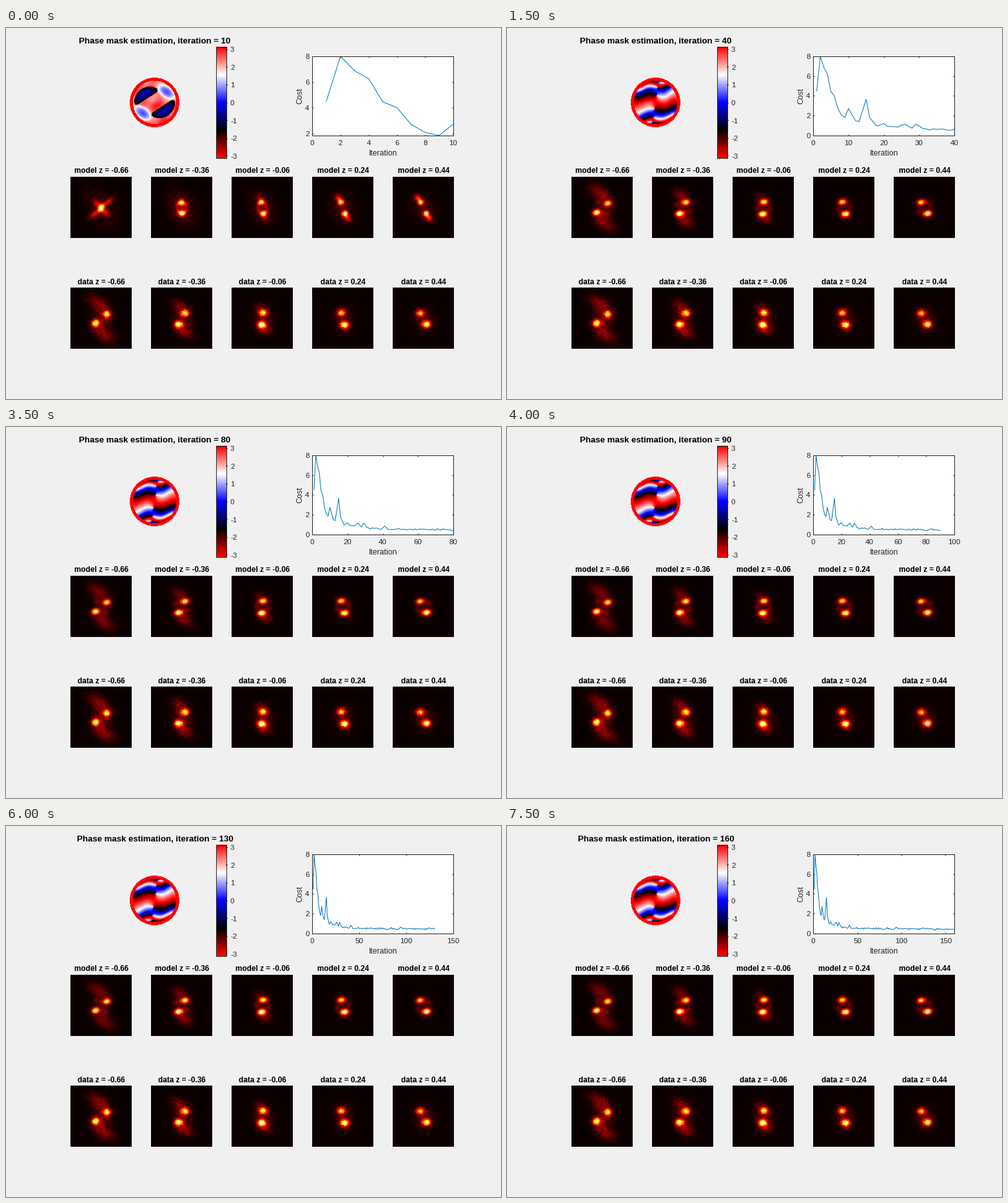
Write a matplotlib script that moves like this. It is 768x576 px and loops after 8 s.

```python
import matplotlib.pyplot as plt
import numpy as np
from matplotlib.animation import FuncAnimation
from matplotlib.colors import LinearSegmentedColormap

W, H, DPI = 768, 576, 100
FRAMES, INTERVAL = 16, 500
TOTAL = 10 * FRAMES
PX = 72 / DPI  # points per pixel
INK = "#262626"
DEPTHS = (-0.66, -0.36, -0.06, 0.24, 0.44)
SIDE, CELLS = 95, 45

plt.rcParams["font.family"] = "Liberation Sans"
PHASE = LinearSegmentedColormap.from_list(
    "phase", ["red", "black", "blue", "white", "red"], N=256)

fig = plt.figure(figsize=(W / DPI, H / DPI), dpi=DPI, facecolor="#f0f0f0")
stage = fig.add_axes([0, 0, 1, 1])


def label(x, y, s, size, **kw):
    kw = {"ha": "center", "va": "baseline", "color": INK, **kw}
    return stage.text(x, y, s, fontsize=size * PX, **kw)


def picture(data, left, top, w, h, cmap, lo, hi):
    return stage.imshow(data, extent=(left, left + w, top + h, top), cmap=cmap,
                        vmin=lo, vmax=hi, interpolation="nearest", aspect="auto")


# ---- cost curve ----
def cost_curve():
    n = np.arange(1, TOTAL + 1)
    knots = [1, 2, 3, 4, 5, 6, 7, 8, 9, 10, 12, 13, 15, 16, 18, 20]
    costs = [4.5, 8, 6.87, 6.25, 4.45, 4, 2.7, 2.07, 1.83, 2.73, 1.5, 1.4,
             3.65, 1.8, 0.95, 1.2]
    late = 0.51 - 0.0007 * (n - 43) + 0.5 * np.exp(-(n - 20) / 9)
    late += 0.05 * np.random.default_rng(4).standard_normal(n.size)
    for at, rise in ((26, 0.45), (29.5, 0.5), (41, 0.25), (94, 0.2)):
        late += rise * np.exp(-(n - at) ** 2)
    return np.where(n <= 20, np.interp(n, knots, costs), late)


def x_axis(it):
    """Upper limit and tick step: at most six steps, rounded up to a tick."""
    step = next(s for s in (2, 5, 10, 20, 50) if it <= 6 * s)
    return min(-(-it // step) * step, TOTAL), step


# ---- phase mask ----
def oval(x, y, cx, cy, a, b, deg, bend=0.0):
    t = np.radians(deg)
    u = (x - cx) * np.cos(t) + (y - cy) * np.sin(t)
    v = (y - cy) * np.cos(t) - (x - cx) * np.sin(t) - bend * (u * u - a * a / 3)
    return np.hypot(u / a, v / b)


def first_phase(x, y):
    p = 2.6 + 0.4 * np.sin(0.13 * x + 0.2 * y) * np.cos(0.12 * x - 0.05 * y)
    for s in (1, -1):
        q = oval(s * x, s * y, 18.5, -16.5, 14, 8, 36)
        rim = p - (p - 1.57) * np.exp(-3 * np.maximum(q - 1, 0))
        p = np.where(q < 1, 1.57 - 1.1 * (1 - q * q), rim)
    for s in (1, -1):
        q = oval(s * x, s * y, -15, -12, 21, 8.5, -33, 0.012)
        p = np.where(q < 1, -1.75 + 1.3 * (1 - q * q), p)
    return p


def helix_phase(x, y, it):
    """Two opposite phase ramps that meet in a column of vortices."""
    d = y - 3 * np.sin(0.15 * x) + 0.2 * x * np.abs(y) / 33
    ramp = 0.125 * d + 0.00012 * d ** 3
    side = np.tanh((x + 0.15 * y) / 5)
    p = np.angle(-np.cos(ramp) - 1j * side * np.sin(ramp))
    rough = np.exp(-(it - 20) / 11)
    p = p + 0.7 * rough * np.sin(0.2 * x + 0.15 * y) * np.cos(0.08 * x - 0.2 * y)
    return np.angle(np.exp(1j * p))


def mask(it):
    x, y = np.meshgrid(np.arange(77) - 38, np.arange(77) - 38)
    r = np.hypot(x, y)
    p = first_phase(x, y) if it == 10 else helix_phase(x, y, it)
    p = np.where(r > 33.6, np.pi, p)
    return np.where(r > 38.4, np.nan, p)


# ---- point spread images ----
axis = (np.arange(CELLS) + 0.5) * SIDE / CELLS
X, Y = np.meshgrid(axis - 47.7, axis - 48.4)


def blob(x, y, amp, sx, sy, deg=0):
    return amp * np.exp(-0.5 * oval(X, Y, x, y, sx, sy, deg) ** 2)


def pair(x, y, amp, sx, sy, deg=0, ratio=1.0):
    """A blob and its mirror image through the centre, `ratio` as strong."""
    return blob(x, y, amp, sx, sy, deg) + blob(-x, -y, ratio * amp, sx, sy, deg)


def lobe(z):
    """The two lobes turn steadily with depth."""
    a, r = np.radians(2 - 75 * z), 9.3 + 4 * z * z
    return r * np.sin(a), -r * np.cos(a)


def cloud(z, amp):
    """Faint arcs that lead from each lobe outwards."""
    (lx, ly), r = lobe(z), 16.5 - 18.7 * z
    cx, cy, size = -0.34 * r, -0.94 * r, r / 29
    upper = np.clip(0.5 - 0.8 * z, 0, 1)
    far = pair(-cx, -cy, amp, 8 * size + 2, 5 * size + 2, 35, upper)
    near = pair(-(cx + lx) / 2 - 3 * size, -(cy + ly) / 2 + 2 * size, amp,
                7 * size + 2, 5 * size + 2, 50, upper)
    return far + near + blob(2, 2, 0.5 * amp, 10, 11)


def lobes(z, sx, sy, deg):
    x, y = lobe(z)
    return pair(-x, -y, 1, sx, sy, deg, 0.87)


def ripple(amount):
    return 1 + amount * np.cos(0.45 * X + 0.5 * Y + 0.05 * X * np.sin(0.2 * Y))


def first_model(z):
    """A cross that opens into a ring and then splits in two lobes."""
    t = (z + 0.66) / 1.1
    x, y = 5 * t - 1, 8.6 * np.tanh(4 * t + 0.25)
    cross = np.exp(-8 * t)
    ring = np.exp(-((t - 0.4) / 0.2) ** 2)
    img = pair(x, y, 1, 3, 3.2, 0, 0.85)
    img += cross * (pair(-10, 9, 0.6, 7, 2.8, -35) + pair(7, 7, 0.5, 5, 3, 45))
    img += 0.4 * ring * np.exp(-((oval(X, Y, 0, 0, 7, 9, 0) - 1) / 0.35) ** 2)
    img += pair(2.2 * x, 1.8 * y, 0.45 * t, 4, 3.2, 35)
    return img + blob(0, 0, 0.13 - 0.06 * t, 13, 23 - 8 * t, -30) * ripple(0.35)


def model(z, it):
    if it == 10:
        img = first_model(z)
    else:
        early = np.exp(-(it - 20) / 13)
        x, y = lobe(z)
        img = lobes(z, 4.3, 3.1, -14) + pair(-y, x, 0.14, 3, 3)
        img += cloud(z, 0.105) * (1 - early * z) * ripple(0.3 * early)
        wisps = blob(4, -20, 1, 3, 6, 30) + blob(15, 2, 1, 3, 8, 35) + blob(-2, 14, 1, 4, 6)
        img += 0.4 * early * max(-z, 0) * wisps
    return img / img.max()


def measured(z, seed):
    rng = np.random.default_rng(seed)
    img = lobes(z, 4.2, 3.7, -8) + cloud(z, 0.125) + blob(0, 0, 0.06, 11, 13)
    img += 0.075 * np.sqrt(img) * rng.standard_normal(img.shape)
    return np.clip(img / img.max(), 0, 1)


# ---- layout ----
title = label(231, 24, "", 13.2, weight="bold", color="black")
disc = picture(mask(10), 192, 77, 77, 77, PHASE, -np.pi, np.pi)
picture(np.linspace(np.pi, -np.pi, 173)[:, None], 326, 29, 17, 173,
        PHASE, -np.pi, np.pi)
stage.add_patch(plt.Rectangle((326, 30), 16, 172, fill=False, ec=INK, lw=PX))
for v in range(-3, 4):
    y = 115.5 - v * 173 / (2 * np.pi)
    stage.plot([341, 343], [y, y], color=INK, lw=PX)
    label(348, y + 4.5, str(v), 11.5, ha="left")

models = []
for k, z in enumerate(DEPTHS):
    left = 100 + 125 * k
    models.append(picture(model(z, 10), left, 231, SIDE, SIDE, "hot", 0, 1))
    picture(measured(z, 20 + k), left, 403, SIDE, SIDE, "hot", 0, 1)
    for name, y in (("model", 225), ("data", 398)):
        label(left + 48, y, f"{name} z = {z}", 11.8, weight="bold", color="black")

label(585.5, 198.5, "Iteration", 12.3)
label(456, 105.5, "Cost", 12.3, rotation=90, va="center")
stage.set(xlim=(0, W), ylim=(H, 0))
stage.axis("off")

plot = fig.add_axes([475.1 / W, 1 - 166.9 / H, 219 / W, 123 / H])
plot.tick_params(direction="in", top=True, right=True, length=2.2 * PX, width=PX,
                 color=INK, labelcolor=INK, labelsize=11.5 * PX)
plot.tick_params(axis="x", pad=7 * PX)
plot.tick_params(axis="y", pad=4.5 * PX)
for spine in plot.spines.values():
    spine.set(color=INK, linewidth=PX)
COST = cost_curve()
line, = plot.plot([], [], color="#0072bd", lw=PX)


def update(i):
    it = 10 * (i + 1)
    title.set_text(f"Phase mask estimation, iteration = {it}")
    disc.set_data(mask(it))
    for z, im in zip(DEPTHS, models):
        im.set_data(model(z, it))
    line.set_data(np.arange(1, it + 1), COST[:it])
    top, step = x_axis(it)
    low = COST[:it].min() if it == 10 else 0
    plot.set_xticks(range(0, top + 1, step))
    plot.set_yticks([v for v in range(0, 9, 2) if v >= low])
    plot.set(xlim=(0, top), ylim=(low, 8))
    return [title, disc, line, *models]


anim = FuncAnimation(fig, update, frames=FRAMES, interval=INTERVAL,
                     repeat=True, repeat_delay=0, blit=False)
plt.show()
```
